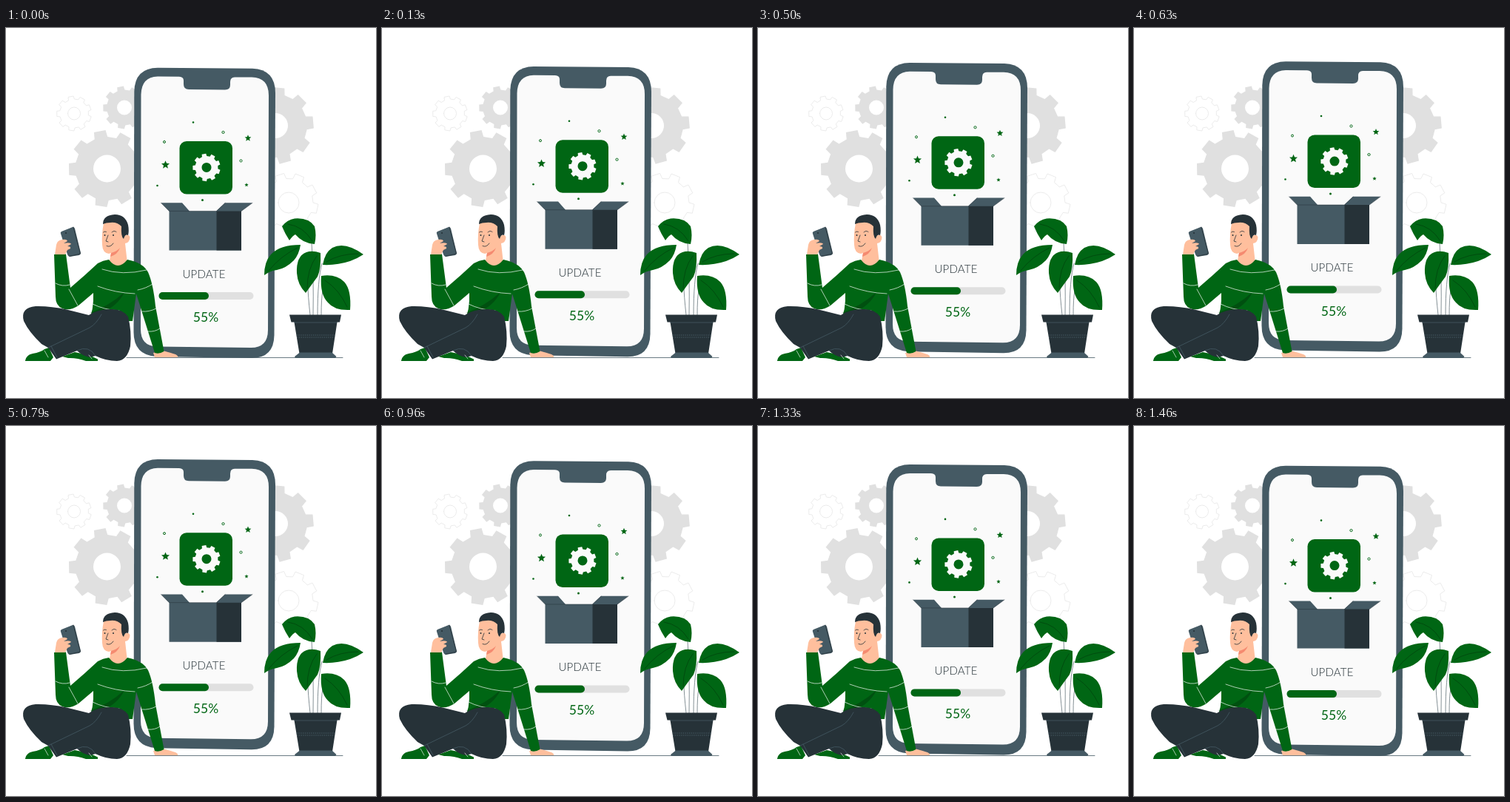
Write an HTML page that moves like this. It is 500 px wide and 500 px high and loops after 1500 ms.

```html
<!DOCTYPE html>
<html lang="en">
<head>
<meta charset="utf-8">
<title>Update</title>
<style>
  html, body { margin: 0; width: 100%; height: 100%; overflow: hidden; background: #fff; }
  svg { display: block; width: 100%; height: 100%; }
  .green { fill: #006614; }
  .slate { fill: #455a64; }
  .dark { fill: #263238; }
  .skin { fill: #ffbf9d; }
  .pale { fill: #e0e0e0; }
  .line { fill: none; stroke-width: .8; stroke-linecap: round; stroke-linejoin: round; }
  text { font-family: Lato, Inter, sans-serif; text-anchor: middle; }
</style>
</head>
<body>
<svg viewBox="0 0 500 500">
  <g id="gears"></g>
  <path class="line" stroke="#455a64" d="M163 445.500H455"/>

  <g id="phone">
    <path class="slate" d="M205 53.700L333 54.700Q364 56 364 88L362.500 415Q362 446 332 446L203 444Q172.500 442 172.500 411L173.300 86Q174 54 205 53.700Z"/>
    <path fill="#fafafa" d="M205 65.500L234 65.700Q240 66 240 71V76Q240 83 247 83L296 83.500Q303 83.500 303 77V73Q303 66.500 309 66.500L332 66.500Q355 67 355 91L354 408Q354 432 331 432L204 430.500Q182 430 182 407L182.500 90Q183 66 205 65.500Z"/>

    <rect class="green" x="234.500" y="153" width="71.500" height="71.500" rx="9.500"/>
    <g id="sparks" class="green"></g>

    <path class="slate" d="M209.500 236.300H238L248 247.500H284L296 236.300H333L318 247.500V300.500H220.500V247.500Z"/>
    <path class="dark" d="M284.500 247.500H318V300.500H284.500Z"/>
    <path class="line" stroke="#263238" stroke-opacity=".65" d="M209.500 236.500L220.500 247.500H284.500L296 236.500M318 247.500L333 236.500"/>

    <text class="dark" x="267.500" y="337.800" font-size="15" font-weight="300" letter-spacing=".2">UPDATE</text>
    <rect class="pale" x="206.500" y="357" width="128" height="10" rx="5"/>
    <rect class="green" x="206.500" y="357" width="67.500" height="10" rx="5"/>
    <text class="green" x="270" y="397" font-size="17.500">55%</text>
  </g>

  <g id="plant">
    <path class="line" stroke="#66757c" d="M411 388Q408 360 408 350M415 388Q416 335 413 290M421 388Q421 340 427 318M426 388Q426 365 428 355"/>
    <g class="green">
      <path d="M373 268Q380 259 390 257.500Q409 256 417 268Q420 280 417 292Q401 291 391 279Q388 280 383 287Q377 278 373 268Z"/>
      <path d="M349 334Q349 316 358 306Q370 293 398 293Q396 306 389 314Q378 325 366 327Q357 328 349 334Z"/>
      <path d="M405 358Q394 347 393 331Q392 308 406 303Q414 300 425 304Q426 325 421 336Q415 344 405 358Z"/>
      <path d="M428 320Q431 303 441 297Q458 288 483 306Q474 312 465 315Q447 321 428 320Z"/>
      <path d="M426 335Q446 332 457 343Q467 354 465 381Q444 382 435 371Q424 360 426 335Z"/>
    </g>
    <path class="line" stroke="#00380b" stroke-opacity=".7" d="M381 265Q402 268 414 288M355 328Q371 308 394 297M407 352Q407 325 420 308M433 316Q451 305 476 305M431 341Q450 353 461 377"/>
    <path class="dark" d="M383 387.500H453L451 397.500H447.500L441 440H396.500L389.500 397.500H385.500Z"/>
    <path class="line" stroke="#455a64" d="M390 398H447"/>
    <path class="line" stroke="#526872" stroke-dasharray=".6 2.200" d="M393 415H444M393.500 418H443.500"/>
    <path class="slate" d="M397 438.500H440.500L446.500 444L445 446H391L390 444Z"/>
  </g>

  <g id="man">
    <path class="skin" d="M199 439L212 436Q223 439 229 441Q233 443 232 445H201Z"/>
    <path class="skin" d="M132 264Q129 278 130 293Q130.500 304 139 305L142 304L139 319Q150 327 164 318L161 291Q167 290 167.500 283Q166 277 160 281L156 258H140Z"/>
    <path fill="#f58a70" d="M142 304Q150 302 154 297Q151 306 141 309Z"/>
    <path class="dark" d="M131 265Q131 253 147 252Q161 252 165 266Q166.500 274 165 280Q161 278 159 285Q155 282 156 268Q150 262 141 263Q135 263 131 265Z"/>
    <path class="line" stroke="#263238" d="M131.500 276Q133 274 135.500 275.500M143 276Q146 273 149 275.500M138 280L135 288L138 289M136 294.500Q141 297 145 291"/>
    <circle class="dark" cx="133.500" cy="280" r="1"/>
    <circle class="dark" cx="145" cy="280" r="1"/>

    <path class="green" d="M65 306L81 305.500L87 351Q107 334 124 318Q131 314 139 313Q151 329 164 313Q185 317 192 330Q199 346 202 376L213.500 437Q207 441 201 439L176 359L171 396H111Q119 382 118 358L98 375Q86 383 76 379Q67 375 67 363Z"/>
    <path fill="#000" fill-opacity=".22" d="M113 385Q139 376 160 357Q151 376 128 385Z"/>
    <path class="line" stroke="#fff" stroke-opacity=".85" d="M67 345Q76 350 86 347M85 353L97 375M130 326Q157 335 190 327M124 349Q148 358 174 359M178 354Q189 352 198 346M117 373Q133 381 153 382M184 383Q193 384 203 379M192 410Q201 411 208 406"/>

    <path class="green" d="M26 449.500Q27 442 36 440Q47 438 52 434L58 432L64 445L60 450H26Z"/>
    <path class="green" d="M76 444L93 438L112 442L124 447.500V450H108Q96 445.500 84 446Z"/>
    <path class="dark" d="M40 376Q60 375.500 82 380.500L112 388Q124 380 141 380Q157 379 165 390Q170 410 168 430Q164 449 150 450Q135 450 121 443L113 445Q103 443 96 436L68 447.500L57 432L48 427Q31 411 24 396Q19 378 40 376Z"/>
    <path class="line" stroke="#455a64" d="M57 432L113 405Q122 400 129 387M96 436Q112 428 121 443M61 430L69 445"/>
    <path class="line" stroke="#fff" stroke-opacity=".8" d="M52 436L57 445M112 442L116 447"/>

    <path class="slate" d="M75 275L90 269Q92 268.500 93 271L101 304Q101 306 99 307L86 309Q84 309 83 306L74 278Q73 276 75 275Z"/>
    <path class="line" stroke="#263238" d="M91 269L100.500 305L86 308.500"/>
    <circle class="dark" cx="81" cy="277" r="1.100"/>
    <path class="skin" d="M66 306L68 293Q69 287 76 286Q82 285 83 288L78 291Q87 289 88 292L83 295Q88 295 87 298L83 300L80 306Z"/>
  </g>
</svg>
<script>
  const LOOP = 1500, RISE = 10, LEAD = 25;
  const $ = id => document.getElementById(id);

  const polar = (x, y, r, deg) => {
    const a = deg * Math.PI / 180;
    return `${(x + r * Math.cos(a)).toFixed(2)} ${(y + r * Math.sin(a)).toFixed(2)}`;
  };

  const ring = (x, y, r) => `M${x - r} ${y}a${r} ${r} 0 1 0 ${2 * r} 0a${r} ${r} 0 1 0 ${-2 * r} 0Z`;

  // Nine-toothed wheel with a hole; `turn` is the angle of one tooth in degrees.
  function gear(x, y, outer, inner, hole, turn, style) {
    const step = 40;
    const points = [];
    for (let a = turn; a < turn + 360; a += step) {
      points.push(polar(x, y, inner, a - step * .3), polar(x, y, outer, a - step * .22),
                  polar(x, y, outer, a + step * .22), polar(x, y, inner, a + step * .3));
    }
    return `<path fill-rule="evenodd" ${style} d="M${points.join('L')}Z${ring(x, y, hole)}"/>`;
  }

  function star(x, y, r) {
    const points = Array.from({ length: 10 }, (_, i) => polar(x, y, i % 2 ? r * .45 : r, i * 36 - 90));
    return `<path d="M${points.join('L')}Z"/>`;
  }

  const dot = (x, y, r) => `<circle cx="${x}" cy="${y}" r="${r}"/>`;
  const bubble = (x, y, r) => `<circle cx="${x}" cy="${y}" r="${r}" fill="none" stroke="#006614"/>`;

  const solid = 'class="pale"';
  const outline = 'class="line" stroke="#e6e6e6"';
  $('gears').innerHTML =
    gear(136.5, 190, 52, 43, 18.5, -101, solid) +
    gear(160, 107.5, 29, 24, 10, -101, solid) +
    gear(364, 132, 52, 43, 17, -5, solid) +
    gear(92, 115.5, 23.5, 19.5, 8.5, -101, outline) +
    gear(382, 236, 40, 33, 14, -68, outline);

  $('sparks').innerHTML =
    gear(271, 188.5, 18.8, 15.5, 6.5, -101, 'fill="#fafafa"') +
    star(215.5, 185, 5.8) + star(327, 149, 4.6) + star(325, 212, 2.8) +
    dot(253, 127.5, 1.3) + dot(204.5, 213, 1.3) + dot(265.5, 232.5, 1.5) +
    bubble(214, 154, 1.5) + bubble(293.5, 141, 1.6) + bubble(317.5, 179.5, 1.6);

  // Straight up and down at constant speed.
  function draw(now) {
    const phase = (now + LEAD) % LOOP / LOOP;
    const lift = RISE * (1 - Math.abs(1 - 2 * phase));
    $('phone').setAttribute('transform', `translate(0 ${(.3 - lift).toFixed(3)})`);
    requestAnimationFrame(draw);
  }
  draw(0);
</script>
</body>
</html>
```
